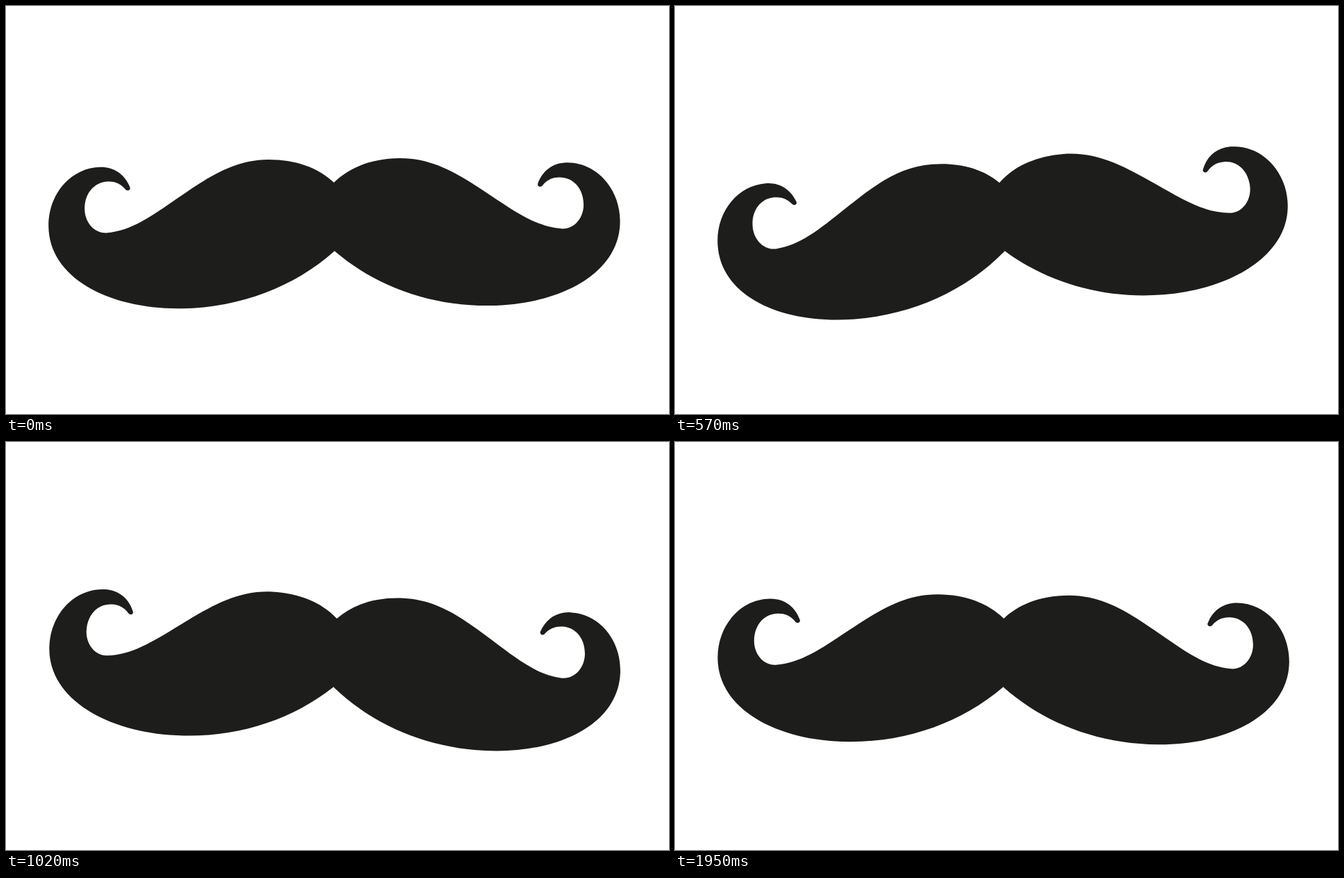
Write an HTML page that moves like this. It is 954 by 587 pixels and loops after 2460 ms.

```html
<!DOCTYPE html>
<html lang="en">
<head>
<meta charset="utf-8">
<title>Moustache wiggle</title>
<style>
  html, body { margin: 0; width: 100%; height: 100%; overflow: hidden; background: #fff; }
  svg { display: block; width: 954px; height: 587px; fill: #1d1d1b; }
</style>
</head>
<body>
<svg viewBox="0 0 954 587">
  <defs>
    <!-- left half; its closing edge bulges past the middle to hide the seam -->
    <path id="half" d="M472.5 254
      C449 231 415 220 378 220
      C328 220 291 245 248 274
      C209 300.5 180 321 144.5 323.5
      C126 324 113.5 307 113.5 289
      C113.5 266 128 249.5 148 249.5
      C158 249.5 166 253 172.5 261
      C174 263.5 179.5 263.5 179.3 259
      C173 241 158 228.5 137 228.5
      C95 228.5 61.3 266 61.3 313
      C61.3 388 148 433.2 250 433.2
      C334 433.2 413 404.5 472.5 352.5
      L480 303Z"/>
  </defs>
  <g id="moustache">
    <use href="#half"/>
    <use href="#half" transform="translate(945 0) scale(-1 1)"/>
  </g>
</svg>
<script>
  const LOOP = 2460, STEP = 30, REST = 0.5;
  const moustache = document.getElementById('moustache');

  // [time in ms, angle in degrees] at each turning point
  const swings = [
    [-47, REST], [185, -9.25], [420, 10.55], [660, -11.5],
    [893, 12.6], [1135, -5.6], [1262, REST]
  ];

  const ease = p => p * p * (3 - 2 * p);

  function angleAt(t) {
    const next = swings.findIndex(([time]) => time > t);
    if (next < 0) return REST;
    const [t0, a0] = swings[next - 1], [t1, a1] = swings[next];
    return a0 + (a1 - a0) * ease((t - t0) / (t1 - t0));
  }

  function draw() {
    const t = Math.floor(performance.now() % LOOP / STEP) * STEP;
    moustache.setAttribute('transform', `rotate(${angleAt(t)} 472.5 326)`);
    requestAnimationFrame(draw);
  }
  draw();
</script>
</body>
</html>
```
